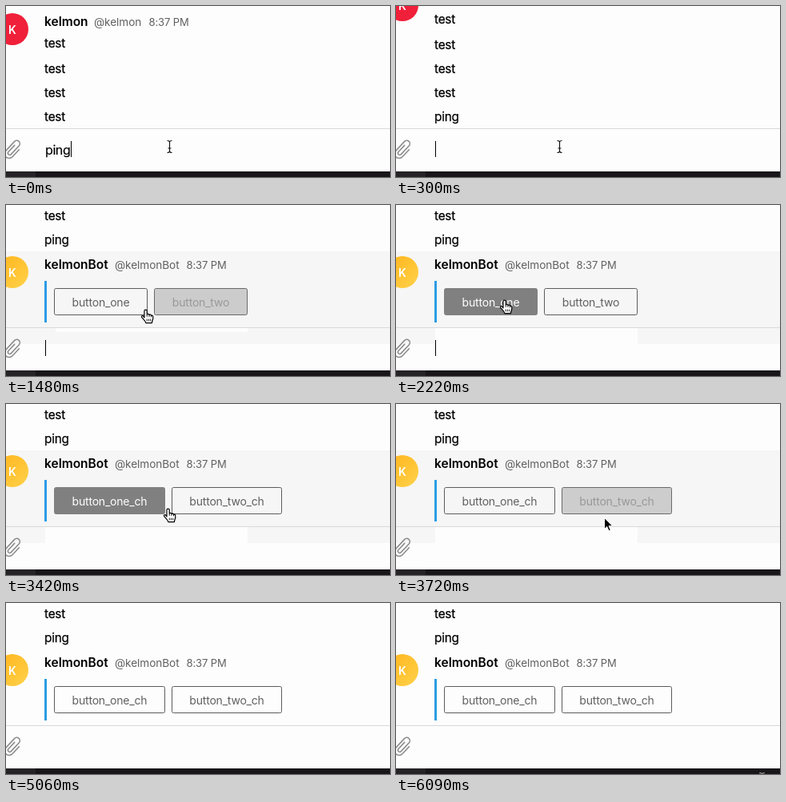
Recreate the animation shown at these times as an HTML page. Size 480x214 px, loop 6.19 s.

```html
<!DOCTYPE html>
<html lang="en">
<head>
<meta charset="utf-8">
<title>Chat buttons</title>
<style>
html, body { margin: 0; width: 100%; height: 100%; overflow: hidden; background: #fdfdfd; }
svg { display: block; width: 480px; height: 214px; font-family: Inter, Roboto, sans-serif; }
.msg { font-size: 15.3px; letter-spacing: -.2px; fill: #000; stroke: #000; stroke-width: .25px; }
.input { font-size: 16px; letter-spacing: -.4px; fill: #000; stroke: #000; stroke-width: .2px; }
.name { font-size: 15.5px; font-weight: 600; letter-spacing: 0; fill: #000; }
.meta { font-size: 13.6px; letter-spacing: -.05px; fill: #606060; }
.time { font-size: 13px; letter-spacing: -.1px; fill: #606060; }
.letter { font-size: 14px; font-weight: 600; text-anchor: middle; fill: #fff; }
.label { font-size: 14px; letter-spacing: -.2px; text-anchor: middle; }
.line { fill: none; stroke: #8c8c8c; stroke-width: 1.4; stroke-linecap: round; }
</style>
</head>
<body>
<svg viewBox="0 0 480 214">
  <defs>
    <linearGradient id="gold" x1="0" y1="0" x2="1" y2="1">
      <stop offset="0" stop-color="#ffb41c"/><stop offset="1" stop-color="#ffd24a"/>
    </linearGradient>
  </defs>
  <rect width="480" height="214" fill="#fdfdfd"/>
  <g id="hover">
    <rect y="58" width="480" height="116" fill="#f6f6f6"/>
    <rect id="patch" fill="#fdfdfd"/>
  </g>

  <g id="thread">
    <circle cx="8" cy="29" r="20" fill="#f0203a"/>
    <text class="letter" x="8" y="35">K</text>
    <text class="name" x="48" y="25">kelmon</text>
    <text class="meta" x="110" y="25">@kelmon</text>
    <text class="time" x="178.500" y="25">8:37 PM</text>
    <text class="msg" x="48" y="52">test</text>
    <text class="msg" x="48" y="84">test</text>
    <text class="msg" x="48" y="114">test</text>
    <text class="msg" x="48" y="144">test</text>
    <text class="msg" id="sent" x="48" y="174">ping</text>
  </g>

  <g id="reply">
    <circle cx="8" cy="84" r="20" fill="url(#gold)"/>
    <text class="letter" x="8" y="90">K</text>
    <text class="name" x="48" y="80">kelmonBot</text>
    <text class="meta" x="136" y="80">@kelmonBot</text>
    <text class="time" x="225.500" y="80">8:37 PM</text>
    <rect x="48" y="95" width="3" height="52" fill="#2b9de4"/>
    <g id="one"><rect y="104.500" height="33" rx="2"/><text class="label" y="127"></text></g>
    <g id="two"><rect y="104.500" height="33" rx="2"/><text class="label" y="127"></text></g>
  </g>

  <rect y="153" width="480" height="1" fill="#d9d9d9"/>
  <path class="line" transform="translate(8.500 180) rotate(43) scale(1.120)"
    d="M5-5V6a5 5 0 0 1-10 0V-8a3.500 3.500 0 0 1 7 0V5a2 2 0 0 1-4 0V-5"/>
  <text class="input" id="draft" x="49" y="186">ping</text>
  <rect id="caret" y="169" width="1" height="20" fill="#000"/>
  <rect y="207" width="480" height="7" fill="#19161a"/>
  <rect y="207" width="37" height="7" fill="#262327"/>

  <g id="ring" fill="none">
    <circle cx="136.500" cy="117" r="9.500" stroke="#000"/>
    <circle cx="136.500" cy="117" r="8.500" stroke="#fff"/>
  </g>
  <g id="beam" fill="none">
    <path d="M-3-7.500Q0-7.500 0-5.500Q0-7.500 3-7.500M0-6V6M-3 7.500Q0 7.500 0 5.500Q0 7.500 3 7.500M-2 2H2" stroke="#fff" stroke-width="2.600"/>
    <path d="M-3-7.500Q0-7.500 0-5.500Q0-7.500 3-7.500M0-6V6M-3 7.500Q0 7.500 0 5.500Q0 7.500 3 7.500M-2 2H2" stroke="#111" stroke-width="1.200"/>
  </g>
  <g id="hand" fill="#fff" stroke="#000" stroke-width="1.100" stroke-linejoin="round">
    <g transform="translate(-1 -.5) scale(1.100)">
      <path d="M4.500 9.500V2a1.500 1.500 0 0 1 3 0V6c.5-1 2.300-.8 2.500.4c.7-.7 2.200-.4 2.300.8c.8-.5 2 0 2 1.200v2.200c0 1-1 2.400-1.200 4.900H6.200C5.600 13 3 11 1.600 9.200C.7 7.900 2 6.800 3.100 7.600Z"/>
      <path d="M7.500 6V8.500M10 6.400V8.700M12.300 7.200V9M7.500 11V13.500M9.500 11V13.500M11.500 11V13.500" stroke-width=".8"/>
    </g>
  </g>
  <path id="arrow" fill="#000" stroke="#fff" d="M.5.500V14.500L3.700 11.500L6 16.700L8.300 15.700L6 10.700H10.700Z"/>
</svg>
<script>
const LOOP = 6190;
const $ = id => document.getElementById(id);
const show = (id, on) => $(id).setAttribute('display', on ? 'inline' : 'none');
const set = (el, attrs) => Object.entries(attrs).forEach(([k, v]) => el.setAttribute(k, v));
const within = (t, a, b) => t >= a && t < b;

// time, pointer shape, position
const pointer = [
  [0, 'beam', 204.5, 176],
  [1190, 'beam', 213.5, 163.5],
  [1340, 'arrow', 203, 141],
  [1480, 'hand', 169, 131],
  [1630, 'hand', 146, 126],
  [1780, 'hand', 130, 119],
  [3420, 'hand', 197, 131],
  [3570, 'hand', 238, 137],
  [3720, 'arrow', 260, 142],
  [3870, 'arrow', 272, 144.5],
  [4010, 'arrow', 292, 152],
  [4160, 'beam', 373.5, 168],
  [4760, 'beam', 406.5, 178],
  [4910, 'arrow', 439.5, 201],
  [5060, 'none', 0, 0],
  [6090, 'beam', 457.5, 221]
];
// time, how far each button is filled
const fills = [
  [0, 0, 0], [1480, 0, .36], [1630, 1, 0],
  [3570, 0, .8], [3720, 0, .35], [3870, 0, 0]
];
const at = (list, t) => list.filter(k => k[0] <= t).pop();

function gray(from, to, k) {
  const v = Math.round(from + (to - from) * k);
  return `rgb(${v},${v},${v})`;
}

function button(id, x, width, label, k, base) {
  const [box, text] = $(id).children;
  set(box, { x: x + .5, width: width - 1, fill: gray(base, 128, k), stroke: gray(92, 128, k) });
  set(text, { x: x + width / 2, fill: gray(96, 255, k) });
  text.textContent = label;
}

function draw(t) {
  const sent = t >= 300, replied = t >= 890;
  const hovered = within(t, 1340, 4160);
  const changed = t >= 2670;

  $('thread').setAttribute('transform', `translate(0 ${replied ? -125 : sent ? -30 : 0})`);
  show('sent', sent);
  show('reply', replied);
  show('draft', !sent);

  show('hover', hovered);
  set($('patch'), t < 1630
    ? { x: 62, y: 153, width: 240, height: 6 }
    : { x: 49, y: 153, width: 253, height: 35 });

  const [, one, two] = at(fills, t);
  const tail = changed ? '_ch' : '', base = hovered ? 246 : 253;
  button('one', 60, changed ? 139 : 117, 'button_one' + tail, one, base);
  button('two', changed ? 207 : 185, changed ? 138 : 117, 'button_two' + tail, two, base);

  show('caret', t < 740 || within(t, 1190, 1630) || within(t, 2220, 2370));
  $('caret').setAttribute('x', sent ? 49 : 81);

  show('ring', within(t, 2370, 2520));
  const [, shape, x, y] = at(pointer, t);
  for (const id of ['beam', 'hand', 'arrow']) show(id, id === shape);
  if (shape !== 'none') $(shape).setAttribute('transform', `translate(${x} ${y})`);
}

const start = performance.now();
function tick() {
  draw((performance.now() - start) % LOOP);
  requestAnimationFrame(tick);
}
tick();
</script>
</body>
</html>
```
